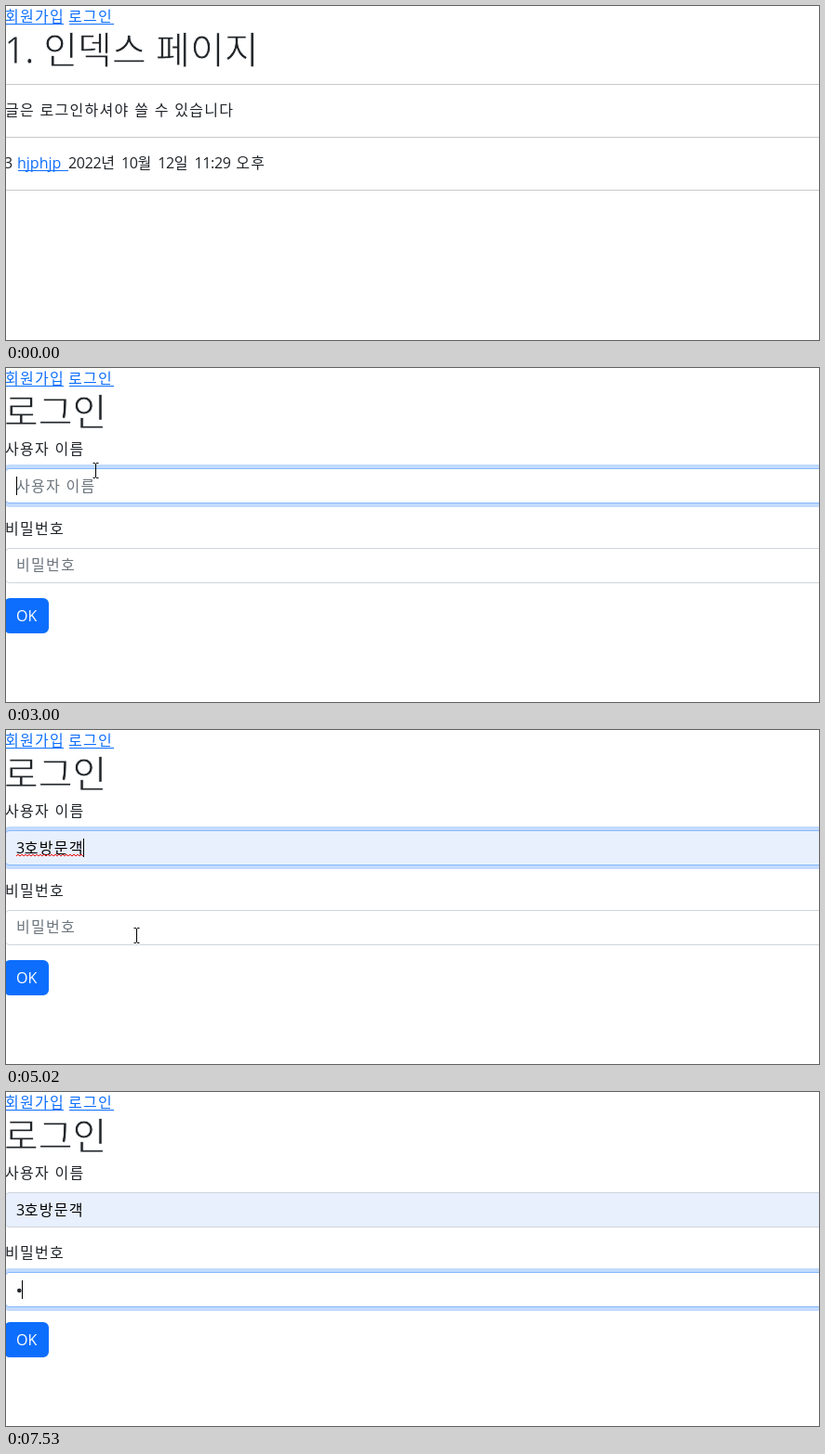
Write an HTML page that moves like this. It is 874 px wide and 360 px high and loops after 8000 ms.

```html
<!DOCTYPE html>
<html lang="ko">
<head>
<meta charset="utf-8">
<title>로그인</title>
<style>
html, body { margin: 0; width: 100%; height: 100%; overflow: hidden; background: #fff; }
svg { display: block; }
text { font-family: "Open Sans", "Noto Sans CJK KR", "Noto Sans CJK", sans-serif; white-space: pre; }
.body { font-size: 16px; word-spacing: 1.4px; }
.small { font-size: 13px; }
.preview { font-size: 13.33px; }
/* A thin background stroke lightens the heading strokes. */
.title { font-size: 40px; stroke: #fff; stroke-width: .8px; }
.hangul { letter-spacing: .08em; }
.title .hangul { letter-spacing: 0; }
.digits { letter-spacing: -.02em; }
</style>
</head>
<body>
<svg id="stage" width="874" height="360" viewBox="0 0 874 360"></svg>
<script>
const LOOP = 8000;
const INK = '#212529', LINK = '#0d6efd', LINK_HOVER = '#0a58ca', MUTED = '#6c757d';
const USER = '3호방문객';
const SUGGESTIONS = ['tirvel@example.com', USER, 'tirvelom', '초루빈', 'noro@forest.test', '01000001234'];

// Each step holds until the next one starts.
const STEPS = [
  { at: 0, page: 'index' },
  { at: 1500, page: 'index', cursor: ['arrow', 595, 256] },
  { at: 2000, page: 'index', cursor: ['arrow', 99, 25] },
  { at: 2500, page: 'index', cursor: ['hand', 76, 13], hover: true },
  { at: 3000, page: 'login', focus: 'name', caret: 11, cursor: ['beam', 96, 110] },
  { at: 3510, page: 'login', focus: 'name', cursor: ['beam', 97, 123] },
  { at: 4010, page: 'login', focus: 'name', caret: 11, menu: true, cursor: ['beam', 97, 123] },
  { at: 4510, page: 'login', focus: 'name', preview: true, menu: true, cursor: ['arrow', 143, 216] },
  { at: 5020, page: 'login', focus: 'name', filled: true, caret: 83, cursor: ['beam', 140, 221] },
  { at: 5510, page: 'login', focus: 'name', filled: true, cursor: ['beam', 132, 208] },
  { at: 6010, page: 'login', focus: 'password', filled: true, caret: 11, cursor: ['beam', 130, 208] },
  { at: 6510, page: 'login', focus: 'password', filled: true, cursor: ['beam', 129, 210] },
  { at: 7030, page: 'login', focus: 'password', filled: true, caret: 11 },
  { at: 7530, page: 'login', focus: 'password', filled: true, typed: true, caret: 17 }
];

const rect = (x, y, w, h, fill, extra = '') =>
  `<rect x="${x}" y="${y}" width="${w}" height="${h}" fill="${fill}" ${extra}/>`;

const path = (d, fill, extra = '') => `<path d="${d}" fill="${fill}" ${extra}/>`;

function text(x, y, content, style = 'body', fill = INK) {
  const runs = content
    .replace(/[가-힣]+|[\d.:]+/g, run =>
      `<tspan class="${run >= '가' ? 'hangul' : 'digits'}">${run}</tspan>`);
  return `<text x="${x}" y="${y}" class="${style}" fill="${fill}">${runs}</text>`;
}

const link = (x, y, width, content, fill = LINK) =>
  text(x, y, content, 'body', fill) + rect(x + 1, y + 2, width, 1, fill);

const nav = hover =>
  link(-1, 17, 62, '회원가입') + link(67, 17, 48, '로그인', hover ? LINK_HOVER : LINK);

function indexPage({ hover }) {
  return nav(hover) +
    text(-2, 62, '1. 인덱스 페이지', 'title') +
    text(-1, 118, '글은 로그인하셔야 쓸 수 있습니다') +
    text(-2, 175, '3') + link(12, 175, 54, 'hjphjp') +
    text(67, 175, '2022년 10월 12일 11:29 오후') +
    [84, 141, 198].map(y => rect(0, y, 874, 1, '#c8c9ca')).join('');
}

function field(y, focused, autofilled) {
  const ring = focused ? rect(-6, y - 4, 900, 46, '#c2dbfe', 'rx="10"') : '';
  const border = focused ? '#86b7fe' : '#ced4da';
  return ring + rect(-1.5, y + .5, 891, 37, autofilled ? '#e8f0fe' : '#fff', `rx="5.5" stroke="${border}"`);
}

function squiggle(x, y, width) {
  let d = `M${x} ${y + 2}`;
  for (let i = 2; i <= width; i += 2) d += `L${x + i} ${y + (i % 4 ? 0 : 2)}`;
  return path(d, 'none', 'stroke="#f00000"');
}

function menu(highlight) {
  const outline = 'M99 155H110L118.500 147L127 155H251Q253 155 253 157V364H97V157Q97 155 99 155Z';
  return path(outline, '#fff', 'filter="url(#shadow)"') +
    (highlight ? rect(97, 195, 156, 36, '#e8e8e8') : '') +
    SUGGESTIONS.map((item, i) => text(109, 182 + 36 * i, item, 'small', '#000')).join('');
}

function loginPage({ focus, caret, preview, filled, typed, menu: open }) {
  const onName = focus === 'name';
  let out = nav() +
    text(-2, 62, '로그인', 'title') +
    text(-1, 93, '사용자 이름') +
    field(108, onName, preview || filled) +
    text(-1, 179, '비밀번호') +
    field(194, !onName, false) +
    rect(-2, 248, 48, 38, LINK, 'rx="6"') +
    text(11, 273, 'OK', 'body', '#fff');

  if (preview) out += text(11, 132, USER, 'preview', '#000');
  else if (filled) out += text(11, 133, USER, 'body', '#000');
  else out += text(11, 133, '사용자 이름', 'body', MUTED);
  if (filled && onName) out += squiggle(11, 134, 72);

  out += typed
    ? `<circle cx="14.300" cy="214" r="2.300" fill="${INK}"/>`
    : text(11, 218, '비밀번호', 'body', MUTED);
  if (caret) out += rect(caret, onName ? 117 : 203, 1, 20, '#000');
  if (open) out += menu(preview);
  return out;
}

const CURSORS = {
  arrow: path('M.5 .5V16.500L4.200 13L6.700 18.500L9.200 17.400L6.800 12H11.700Z', '#fff', 'stroke="#000"'),
  beam: path('M-3 -7.500H-.5M.5 -7.500H3M0 -7V8M-3 8.500H-.5M.5 8.500H3', 'none', 'stroke="#000" transform="translate(.5 0)"'),
  hand: path('M5.500 14V2.500Q5.500 .5 7 .5T8.500 2.500V8.500Q10 6.800 11.300 9Q13 7.700 14 9.800Q16.500 8.800 16.500 11.500V16Q16.500 18 14.500 20.500V23.500H6.500V21L2 15.500Q.2 12.700 1.500 11.800Q3 11 5.500 14ZM8.500 8V13M11.400 9V13M14 10V13',
    '#fff', 'stroke="#000" stroke-linejoin="round"')
};

const DEFS = `<defs><filter id="shadow" x="-10%" y="-10%" width="120%" height="120%">
  <feDropShadow dx="0" dy="1" stdDeviation="1.200" flood-opacity=".35"/></filter></defs>`;

function draw(step) {
  let out = DEFS + rect(0, 0, 874, 360, '#fff');
  out += step.page === 'index' ? indexPage(step) : loginPage(step);
  if (step.cursor) {
    const [shape, x, y] = step.cursor;
    out += `<g transform="translate(${x} ${y})">${CURSORS[shape]}</g>`;
  }
  stage.innerHTML = out;
}

const stage = document.getElementById('stage');
const start = performance.now();
let shown;

function tick() {
  const time = (performance.now() - start) % LOOP;
  const step = STEPS.findLast(s => s.at <= time) || STEPS[0];
  if (step !== shown) draw(shown = step);
  requestAnimationFrame(tick);
}
tick();
</script>
</body>
</html>
```
